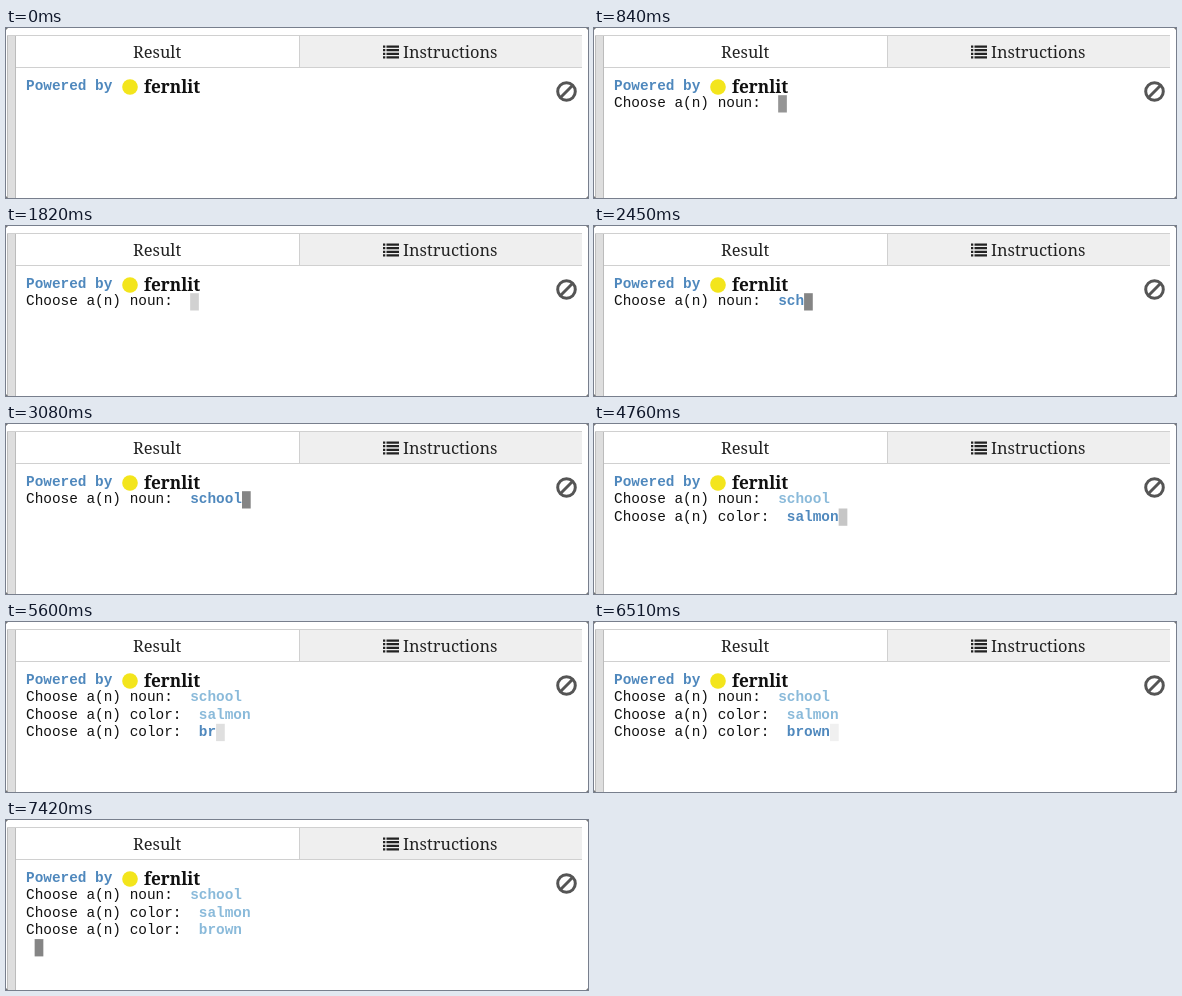
These frames come from a looping animation (582x170 px, 7490 ms). An HTML page:

```html
<!DOCTYPE html>
<html lang="en">
<head>
<meta charset="utf-8">
<title>Word prompts</title>
<style>
  html, body { margin: 0; width: 582px; height: 170px; overflow: hidden; background: #fff; }
  svg { display: block; }
  text { white-space: pre; }
  .tab { font: 16.4px "Noto Serif", serif; fill: #222; }
  .brand { font: bold 17.2px "Noto Serif", serif; fill: #111; }
  .term { font: 14.4px "Courier New", "Liberation Mono", monospace; fill: #111; }
  .blue { font-weight: bold; fill: #4f88bd; }
  .done { font-weight: bold; fill: #8abada; }
</style>
</head>
<body>
<svg id="stage" width="582" height="170" viewBox="0 0 582 170">
  <!-- frame and tabs -->
  <path fill="#dedede" d="M1 7h9v163h-9z"/>
  <path fill="#efefef" d="M293 8h283v32h-283z"/>
  <path fill="none" stroke="#bcbcbc" d="M1.5 7.5V170M9.5 7.5V170"/>
  <path fill="none" stroke="#d0d0d0" d="M1 7.5H576M293.5 8V39.5M10 39.5H576"/>
  <path fill="#777" d="M0 168l2 2H0zM582 168l-2 2h2zM0 0h2L0 2zM582 0h-2l2 2z"/>
  <text class="tab" x="127" y="30">Result</text>
  <text class="tab" x="397" y="30">Instructions</text>
  <path stroke="#222" stroke-width="2.2" d="M377 18.6h2.3m1.2 0H393M377 22.2h2.3m1.2 0H393M377 25.8h2.3m1.2 0H393M377 29.4h2.3m1.2 0H393"/>
  <!-- heading and stop button -->
  <text class="term blue" x="20" y="62">Powered by</text>
  <circle cx="124" cy="59" r="7.8" fill="#f3e51c"/>
  <text class="brand" x="138" y="65">fernlit</text>
  <g fill="none" stroke="#555" stroke-width="3">
    <circle cx="560.5" cy="63.5" r="8.8"/>
    <path d="M554.3 69.7l12.4-12.4"/>
  </g>
</svg>
<script>
const LOOP = 7490, STEP = 70, FADE = 80;
const LEFT = 20, CHAR = 8.64, ROW = 17.3;

// keys: time of each typed letter; blink: times the cursor turns on, off, on...
const lines = [
  { prompt: "Choose a(n) noun:  ", word: "school", start: 210, end: 3220,
    keys: [2100, 2240, 2380, 2520, 2660, 2870], blink: [771, 1330, 1790, 2480, 2800] },
  { prompt: "Choose a(n) color:  ", word: "salmon", start: 3220, end: 5040,
    keys: [3640, 3920, 4200, 4340, 4480, 4690], blink: [3762, 4270, 4723] },
  { prompt: "Choose a(n) color:  ", word: "brown", start: 5040, end: 6650,
    keys: [5250, 5390, 5740, 6090, 6370], blink: [5579, 6030, 6500] },
  { prompt: " ", word: "", start: 6650, end: LOOP, keys: [], blink: [7070] }
];

const stage = document.getElementById("stage");

function add(tag, attrs) {
  const el = document.createElementNS("http://www.w3.org/2000/svg", tag);
  for (const name in attrs) el.setAttribute(name, attrs[name]);
  return stage.appendChild(el);
}

lines.forEach((line, i) => {
  const y = Math.round(79.4 + ROW * i);
  line.wordX = LEFT + CHAR * line.prompt.length;
  line.label = add("text", { class: "term", x: LEFT, y });
  line.label.textContent = line.prompt;
  line.input = add("text", { x: line.wordX, y });
  line.cursor = add("rect", { y: 67.2 + ROW * i, width: 8.7, height: ROW, fill: "#858585" });
});

function cursorLevel(blink, t) {
  const passed = blink.filter(b => b <= t);
  if (!passed.length) return 0;
  const ramp = Math.min(1, (t - passed[passed.length - 1]) / FADE);
  return passed.length % 2 ? ramp : 1 - ramp;
}

function draw() {
  const t = Math.floor(performance.now() % LOOP / STEP) * STEP;
  for (const line of lines) {
    const shown = t >= line.start, done = t >= line.end;
    const count = line.keys.filter(k => k <= t).length;
    line.label.setAttribute("visibility", shown ? "visible" : "hidden");
    line.input.textContent = line.word.slice(0, count);
    line.input.setAttribute("class", done ? "term done" : "term blue");
    line.cursor.setAttribute("x", line.wordX + CHAR * count);
    line.cursor.setAttribute("opacity", shown && !done ? cursorLevel(line.blink, t) : 0);
  }
  requestAnimationFrame(draw);
}
draw();
</script>
</body>
</html>
```
